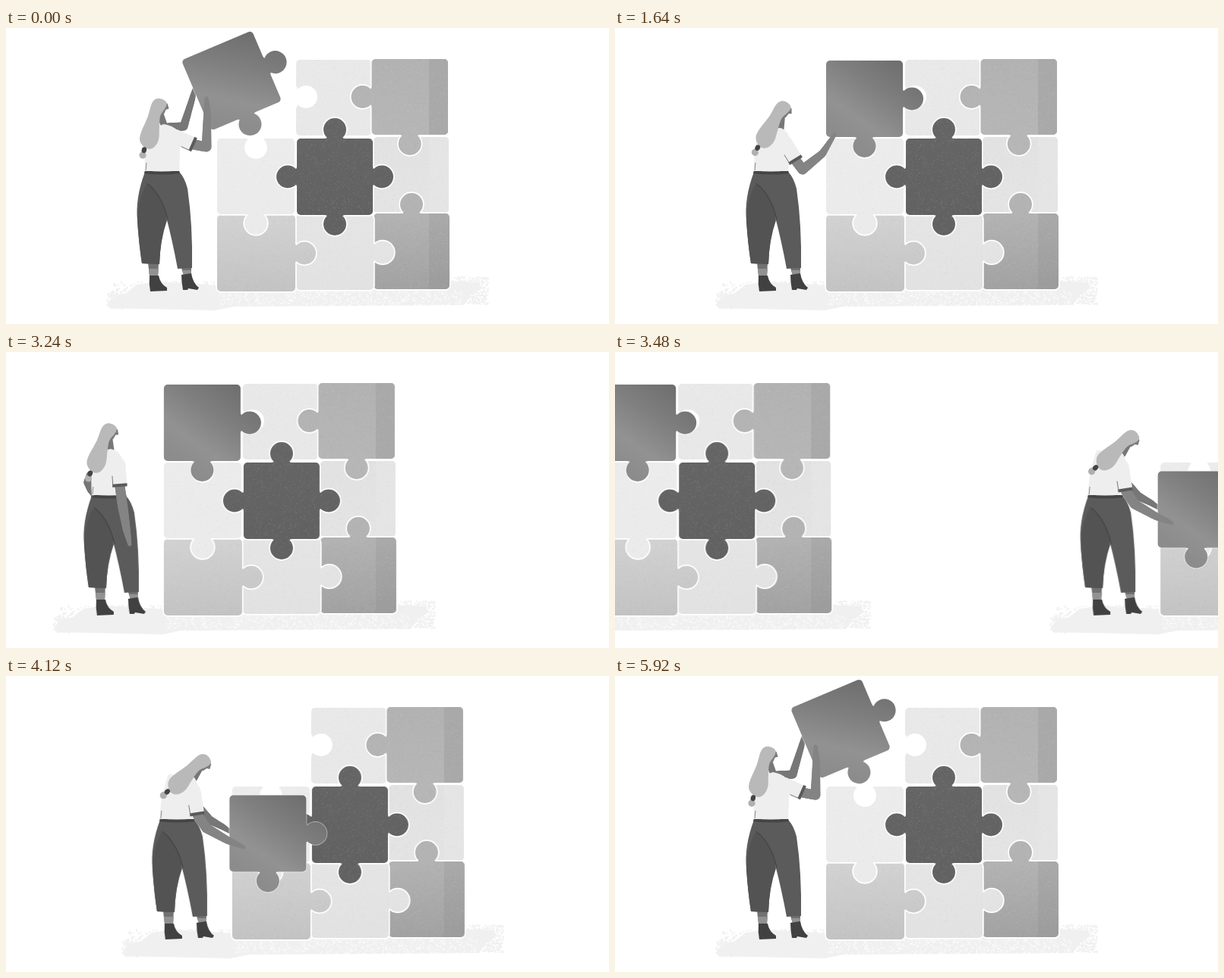
Recreate the animation shown at these times as an HTML page with a canvas. Size 794 px wide and 391 px high, loop 5960 ms.

```html
<!DOCTYPE html>
<html lang="en">
<head>
<meta charset="utf-8">
<title>Puzzle</title>
<style>
html, body { margin: 0; width: 100%; height: 100%; overflow: hidden; background: #fff; }
canvas { display: block; }
</style>
</head>
<body>
<canvas id="stage" width="794" height="391"></canvas>
<script>
const W = 794, H = 391, LOOP = 5960, GAP = 739;
const PAN_START = 2840, PAN_TIME = 1600;
const ctx = document.getElementById('stage').getContext('2d');

let seed = 7;
const rand = () => (seed = (seed * 16807) % 2147483647) / 2147483647;

// ---- Puzzle ----
const KNOB = new Path2D('M-14 1V0Q-9 0-11-3H11Q9 0 14 0V1ZM-15-12A15 15 0 1 1 15-12A15 15 0 1 1-15-12Z');

function addKnob(path, x, y, angle) {
  path.addPath(KNOB, new DOMMatrix().translate(x, y).rotate(angle));
}

function piecePath(x, y, w, h, knobs) {
  const path = new Path2D();
  path.roundRect(x, y, w, h, 5);
  if (knobs.includes('t')) addKnob(path, x + w / 2, y, 0);
  if (knobs.includes('r')) addKnob(path, x + w, y + h / 2, 90);
  if (knobs.includes('b')) addKnob(path, x + w / 2, y + h, 180);
  if (knobs.includes('l')) addKnob(path, x, y + h / 2, 270);
  return path;
}

function grain(g, n, x, y, w, h, color, size = 1) {
  g.fillStyle = color;
  for (let i = 0; i < n; i++) g.fillRect(x + rand() * w, y + rand() * h, size, size);
}

function drawPiece(g, [x, y, w, h, knobs, top, bottom, strip]) {
  const path = piecePath(x, y, w, h, knobs);
  g.strokeStyle = '#fff';
  g.lineWidth = 3.4;
  g.stroke(path);
  const fill = g.createLinearGradient(0, y, 0, y + h);
  fill.addColorStop(0, top);
  fill.addColorStop(1, bottom);
  g.fillStyle = fill;
  g.fill(path);
  g.save();
  g.clip(path);
  if (strip) {
    g.fillStyle = strip;
    g.fillRect(557, y, 40, h);
  }
  grain(g, 1200, x - 28, y - 28, w + 56, h + 56, 'rgba(255,255,255,.13)');
  grain(g, 900, x - 28, y - 28, w + 56, h + 56, 'rgba(0,0,0,.04)');
  g.restore();
}

const PIECES = [
  [484, 144, 99, 100, '', '#e2e2e2', '#e4e4e4', '#e5e5e5'],
  [484, 245, 100, 100, 't', '#b3b3b3', '#a2a2a2', 'rgba(130,130,130,.2)'],
  [382, 42, 99, 100, '', '#e9e9e9', '#e8e8e8'],
  [481.5, 41, 100.5, 100, 'lb', '#b2b2b2', '#b6b6b6', '#a9a9a9'],
  [382, 247, 102, 99, 'r', '#e5e5e5', '#e2e2e2'],
  [278, 247, 103, 101, 'r', '#d2d2d2', '#c3c3c3'],
  [278, 146, 102, 100, 'b', '#ececec', '#ebebeb'],
  [383, 146, 100, 101, 'trbl', '#656565', '#626262']
];

const loose = piecePath(-50.5, -50.5, 101, 101, 'rb');
const looseFill = ctx.createLinearGradient(45, -55, -30, 50);
looseFill.addColorStop(0, '#6d6d6d');
looseFill.addColorStop(.4, '#7f7f7f');
looseFill.addColorStop(.75, '#929292');
looseFill.addColorStop(1, '#8c8c8c');

function drawLoose([x, y, angle]) {
  ctx.save();
  ctx.translate(x, y);
  ctx.rotate(angle * Math.PI / 180);
  ctx.strokeStyle = 'rgba(255,255,255,.45)';
  ctx.lineWidth = 2;
  ctx.stroke(loose);
  ctx.fillStyle = looseFill;
  ctx.fill(loose);
  ctx.restore();
}

// ---- Still parts: ground, fixed pieces, legs ----
const still = document.createElement('canvas');
still.width = W;
still.height = H;

function drawStill(g) {
  const shape = (d, color) => { g.fillStyle = color; g.fill(new Path2D(d)); };

  shape('M135 362Q140 354 158 350L172 339L200 335L280 340L584 334L622 336Q630 345 612 352L603 366L300 368L276 373L137 370Z', '#f0f0f0');
  grain(g, 450, 570, 328, 64, 36, '#f0f0f0', 2);
  grain(g, 250, 140, 334, 140, 24, '#f0f0f0', 2);
  grain(g, 130, 132, 348, 30, 22, '#f0f0f0', 2);
  grain(g, 500, 280, 346, 320, 20, 'rgba(255,255,255,.5)', 2);

  PIECES.forEach(p => drawPiece(g, p));
  const holes = new Path2D();
  addKnob(holes, 329, 146, 180);
  addKnob(holes, 383, 91, 90);
  g.fillStyle = '#fff';
  g.fill(holes);

  shape('M187 310H201L200 328H189ZM231 317H244V325L234 327Z', '#717171');
  shape('M188 318H201L200 328H189ZM232 320H244V325L234 327Z', '#929292');
  shape('M189 327H201Q203 338 212 343V347L190 348Q188 338 189 327Z', '#414141');
  shape('M231 326L244 324Q246 337 254 343L252 346L240 344L239 346H233Q231 336 231 326Z', '#414141');
  shape('M183 190Q170 225 173 255Q175 285 179 311L202 312Q203 280 211 250Q219 280 226 318L245 317Q246 260 239 212Q235 197 228 190Z', '#5b5b5b');
  shape('M186 204Q174 225 173 255Q175 285 179 311L202 312Q203 280 212 254Q208 225 186 204Z', '#535353');
  g.strokeStyle = '#474747';
  g.lineWidth = 1.5;
  g.stroke(new Path2D('M187 206Q206 222 213 253'));
  shape('M183 188Q205 191 228 188L229 192Q205 195 182 192Z', '#454545');
}
drawStill(still.getContext('2d'));

// ---- Woman ----
// Head x, y, tilt; neck; sleeve start, cuff; near elbow, wrist, hand; far shoulder, elbow, wrist, hand.
const LIFT = [200, 105, 15, 208, 127, 222, 143, 247, 154, 264, 157, 265, 115, 264, 93, 213, 131, 234, 130, 245, 94, 248, 81];
const PUSH = [214, 106, 24, 214, 130, 224, 149, 244, 166, 259, 172, 280, 134, 294, 100, 218, 136, 242, 148, 264, 116, 276, 100];
const REST = [219, 108, 29, 218, 132, 224, 152, 238, 175, 247, 187, 273, 166, 289, 141, 205, 150, 205, 165, 205, 172, 205, 180];
const IDLE = [204, 106, 20, 208, 128, 218, 149, 220, 177, 224, 205, 229, 235, 233, 254, 182, 162, 178, 172, 181, 182, 184, 188];
const GRAB = [237, 114, 46, 228, 134, 227, 152, 232, 183, 244, 201, 272, 217, 293, 226, 235, 175, 248, 190, 265, 199, 276, 206];
const HOIST = [226, 108, 31, 222, 132, 226, 150, 234, 179, 245, 200, 275, 214, 297, 218, 236, 172, 255, 186, 275, 194, 284, 197];
const mix = (a, b, u) => a.map((v, i) => v + (b[i] - v) * u);

const HAIR = [[3, -13], [11, -9], [9, 1], [5, 9], [9, 27], [13, 42], [8, 55], [-2, 57], [-13, 49], [-13, 35], [-9, 15], [-10, -3], [-6, -11]];
const hairPath = new Path2D();
HAIR.forEach(([x, y], i) => {
  const [nx, ny] = HAIR[(i + 1) % HAIR.length];
  const [px, py] = HAIR.at(i - 1);
  if (!i) hairPath.moveTo((px + x) / 2, (py + y) / 2);
  hairPath.quadraticCurveTo(x, y, (x + nx) / 2, (y + ny) / 2);
});
const facePath = new Path2D('M4-9L11-8L14.5-2L11 0L10 6L4 11Z');

function line(x0, y0, x1, y1, width, color, cap = 'butt') {
  ctx.strokeStyle = color;
  ctx.lineWidth = width;
  ctx.lineCap = cap;
  ctx.beginPath();
  ctx.moveTo(x0, y0);
  ctx.lineTo(x1, y1);
  ctx.stroke();
}

// Tapered limb: points as a flat list, one width per point.
function limb(p, widths, color) {
  const steps = 12;
  for (let i = 0; i < widths.length - 1; i++) {
    const [x0, y0, x1, y1] = p.slice(2 * i, 2 * i + 4);
    for (let s = 0; s < steps; s++) {
      const u = s / steps, v = (s + 1) / steps;
      line(x0 + (x1 - x0) * u, y0 + (y1 - y0) * u, x0 + (x1 - x0) * v, y0 + (y1 - y0) * v,
        widths[i] + (widths[i + 1] - widths[i]) * v, color, 'round');
    }
  }
}

function drawBody(pose) {
  const [hx, hy, tilt, nx, ny, jx, jy, kx, ky] = pose;
  const angle = tilt * Math.PI / 180;
  const inHead = draw => {
    ctx.save();
    ctx.translate(hx, hy);
    ctx.rotate(angle);
    draw();
    ctx.restore();
  };

  const cos = Math.cos(angle), sin = Math.sin(angle);
  line(hx + 4 * cos - 6 * sin, hy + 4 * sin + 6 * cos, nx, ny + 1, 9, '#777', 'round');
  inHead(() => { ctx.fillStyle = '#7b7b7b'; ctx.fill(facePath); });

  ctx.fillStyle = '#eee';
  ctx.beginPath();
  ctx.moveTo(183, 189);
  ctx.quadraticCurveTo(182, 165, nx - 20 - tilt * .3, ny + 14 - tilt * .4);
  ctx.lineTo(nx, ny);
  ctx.quadraticCurveTo(jx + 4, ny + 3, jx + 8, jy);
  ctx.lineTo(228, 189);
  ctx.fill();
  line(185, 178, 184, 188, 1, '#888');

  limb(pose.slice(7, 15), [13, 13, 10, 5], '#848484');

  // Sleeve with dark cuff and a seam along its back edge
  const len = Math.hypot(kx - jx, ky - jy);
  const dx = (kx - jx) / len, dy = (ky - jy) / len;
  ctx.fillStyle = '#eee';
  ctx.beginPath();
  ctx.arc(jx, jy, 9.5, 0, 7);
  ctx.fill();
  line(jx, jy, kx, ky, 19, '#eee');
  line(kx - dx * 3, ky - dy * 3, kx + dx, ky + dy, 19.5, '#5a5a5a');
  line(kx - dy * 9 - dx * 14, ky + dx * 9 - dy * 14, kx - dy * 9, ky + dx * 9, 1, '#777');

  inHead(() => {
    ctx.fillStyle = '#b0b0b0';
    ctx.beginPath();
    ctx.arc(-3, 66, 4.6, 0, 7);
    ctx.fill();
    ctx.fillStyle = '#b9b9b9';
    ctx.fill(hairPath);
    ctx.fillStyle = '#444';
    ctx.beginPath();
    ctx.ellipse(-3, 59, 3.2, 4, 0, 0, 7);
    ctx.fill();
  });
}

// ---- Motion ----
const HIGH = [297, 69.5, -23], PLACED = [328.5, 93.5, 0], LOW = [325, 208, 0];
const FIRST = {
  pose: [[0, LIFT], [640, PUSH], [1220, PUSH], [1640, REST], [1800, mix(REST, IDLE, .62)], [2320, IDLE]],
  piece: [[0, HIGH], [600, [326, 90, -3]], [800, PLACED]]
};
const SECOND = {
  pose: [[4640, GRAB], [5200, HOIST], [5800, mix(HOIST, LIFT, .98)], [LOOP, LIFT]],
  piece: [[4640, LOW], [5200, [333, 208.5, 9.7]], [5370, [345, 178, 5]], [5800, [298, 71, -22]], [LOOP, HIGH]]
};

// Monotone cubic interpolation between keys
function track(keys, t) {
  let i = 1;
  while (i < keys.length - 1 && t > keys[i][0]) i++;
  const [t0, a] = keys[i - 1], [t1, b] = keys[i], h = t1 - t0;
  const u = Math.min(1, Math.max(0, (t - t0) / h));
  const slope = (k, j) => k < 1 || k >= keys.length ? 0
    : (keys[k][1][j] - keys[k - 1][1][j]) / (keys[k][0] - keys[k - 1][0]);
  const tangent = (p, q) => p * q > 0 ? 2 * p * q / (p + q) : 0;
  const ease = u * u * (3 - 2 * u);
  return a.map((v, j) => {
    const s = slope(i, j);
    return v + (b[j] - v) * ease
      + h * tangent(slope(i - 1, j), s) * u * (1 - u) ** 2
      - h * tangent(s, slope(i + 1, j)) * u * u * (1 - u);
  });
}

// cubic-bezier(.6, 0, .21, 1)
function panEase(x) {
  if (x <= 0 || x >= 1) return x <= 0 ? 0 : 1;
  let lo = 0, hi = 1;
  for (let i = 0; i < 24; i++) {
    const s = (lo + hi) / 2, r = 1 - s;
    if (3 * s * r * r * .6 + 3 * s * s * r * .21 + s ** 3 < x) lo = s; else hi = s;
  }
  return lo * lo * (3 - 2 * lo);
}

function drawScene(scene, t, x) {
  const pose = track(scene.pose, t);
  ctx.save();
  ctx.translate(x, 0);
  ctx.drawImage(still, 0, 0);
  limb(pose.slice(15, 23), [11, 11, 8, 5], '#777');
  drawLoose(track(scene.piece, t));
  drawBody(pose);
  ctx.restore();
}

let start;
function frame(now) {
  start ??= now;
  const t = (now - start) % LOOP;
  const pan = GAP * panEase((t - PAN_START) / PAN_TIME);
  ctx.fillStyle = '#fff';
  ctx.fillRect(0, 0, W, H);
  if (pan < GAP) drawScene(FIRST, t, -pan);
  if (pan > 0) drawScene(SECOND, t, GAP - pan);
  requestAnimationFrame(frame);
}
requestAnimationFrame(frame);
</script>
</body>
</html>
```
